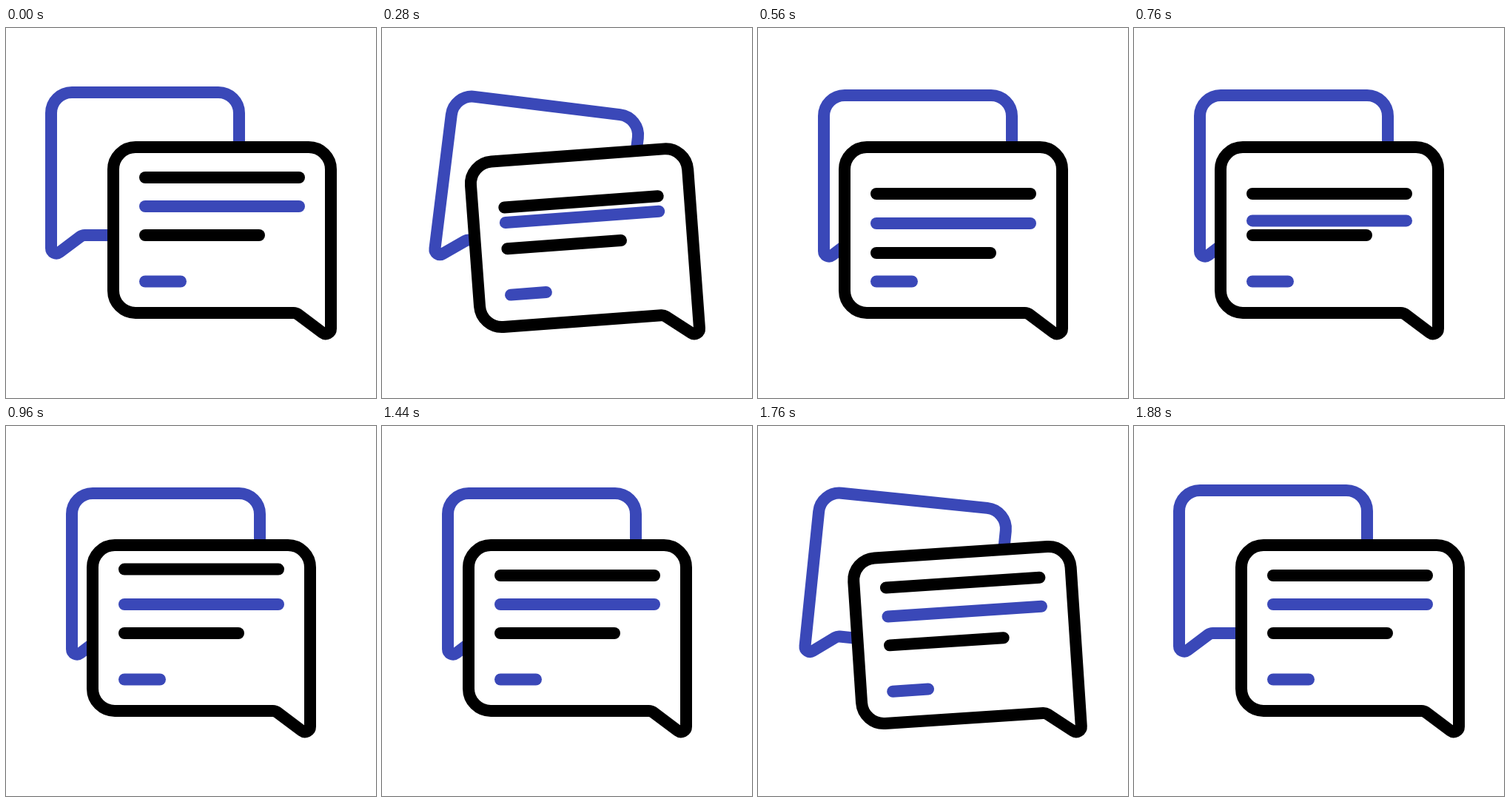
An HTML page with a canvas for the animation above (2 s loop, 500 by 500 pixels).

```html
<!DOCTYPE html>
<html lang="en">
<head>
<meta charset="utf-8">
<title>Chat bubbles</title>
<style>
html, body { margin: 0; width: 100%; height: 100%; overflow: hidden; background: #fff; }
canvas { display: block; width: 500px; height: 500px; }
</style>
</head>
<body>
<canvas id="stage" width="500" height="500"></canvas>
<script>
const ctx = document.getElementById('stage').getContext('2d');
const LOOP = 2000, STEP = 40;
const BLACK = '#000', BLUE = '#3a48b8';

const smooth = u => u * u * (3 - 2 * u);

// Eased value along [time, value] keys
function track(t, keys) {
  if (t <= keys[0][0]) return keys[0][1];
  for (let i = 1; i < keys.length; i++) {
    const [t0, a] = keys[i - 1], [t1, b] = keys[i];
    if (t < t1) return a + (b - a) * smooth((t - t0) / (t1 - t0));
  }
  return keys[keys.length - 1][1];
}

const SHIFT = [[155, 0], [475, 1], [1480, 1], [1810, 0]];

// Each bubble tilts into its move, swings back, then settles
const tilt = (lean, back) => [
  [80, 0], [260, lean], [388, back], [480, 0],
  [1480, 0], [1580, back], [1700, lean], [1880, 0]
];
const FRONT_TILT = tilt(-5.1, 8.4);
const BACK_TILT = tilt(7.9, -5.2);

const LINE_Y = [
  [[80, 202], [240, 224], [870, 224], [1020, 177], [1180, 202]],
  [[240, 241], [400, 264], [720, 264], [880, 241]],
  [[400, 280], [560, 304], [720, 280]]
];
const SHORT_END = [[960, 236], [1200, 408], [1440, 236]];

function pose(x, y, px, py, deg, draw) {
  ctx.save();
  ctx.translate(x + px, y + py);
  ctx.rotate(deg * Math.PI / 180);
  ctx.translate(-px, -py);
  draw();
  ctx.restore();
}

// Box whose tail hangs below the corner at x = tailX
function bubble(tailX, farX, top, bottom, bendX, radius, color) {
  const tipY = bottom + Math.abs(tailX - bendX) * 0.75;
  const mid = (tailX + farX) / 2;
  ctx.beginPath();
  ctx.moveTo(mid, top);
  ctx.arcTo(farX, top, farX, bottom, radius);
  ctx.arcTo(farX, bottom, mid, bottom, radius);
  ctx.arcTo(bendX, bottom, tailX, tipY, 10);
  ctx.arcTo(tailX, tipY, tailX, top, 7);
  ctx.arcTo(tailX, top, mid, top, radius);
  ctx.closePath();
  ctx.fillStyle = '#fff';
  ctx.fill();
  ctx.strokeStyle = color;
  ctx.stroke();
}

function line(y, end, color) {
  ctx.beginPath();
  ctx.moveTo(188, y);
  ctx.lineTo(end, y);
  ctx.strokeStyle = color;
  ctx.stroke();
}

function render(t) {
  const p = track(t, SHIFT);
  ctx.fillStyle = '#fff';
  ctx.fillRect(0, 0, 500, 500);
  ctx.lineWidth = 16;
  ctx.lineCap = ctx.lineJoin = 'round';

  pose(28 * p, 4 * p, 66, 305, track(t, BACK_TILT), () =>
    bubble(61, 315, 87, 280, 103, 28, BLUE));

  pose(-28 * p, 0, 432, 413, track(t, FRONT_TILT), () => {
    bubble(439, 145, 161, 385, 392, 30, BLACK);
    line(track(t, LINE_Y[0]), 396, BLACK);
    line(track(t, LINE_Y[1]), 396, BLUE);
    line(track(t, LINE_Y[2]), 342, BLACK);
    line(342.5, track(t, SHORT_END), BLUE);
  });
}

const start = performance.now();
function tick() {
  const t = (performance.now() - start) % LOOP;
  render(Math.floor(t / STEP) * STEP);
  requestAnimationFrame(tick);
}
tick();
</script>
</body>
</html>
```
